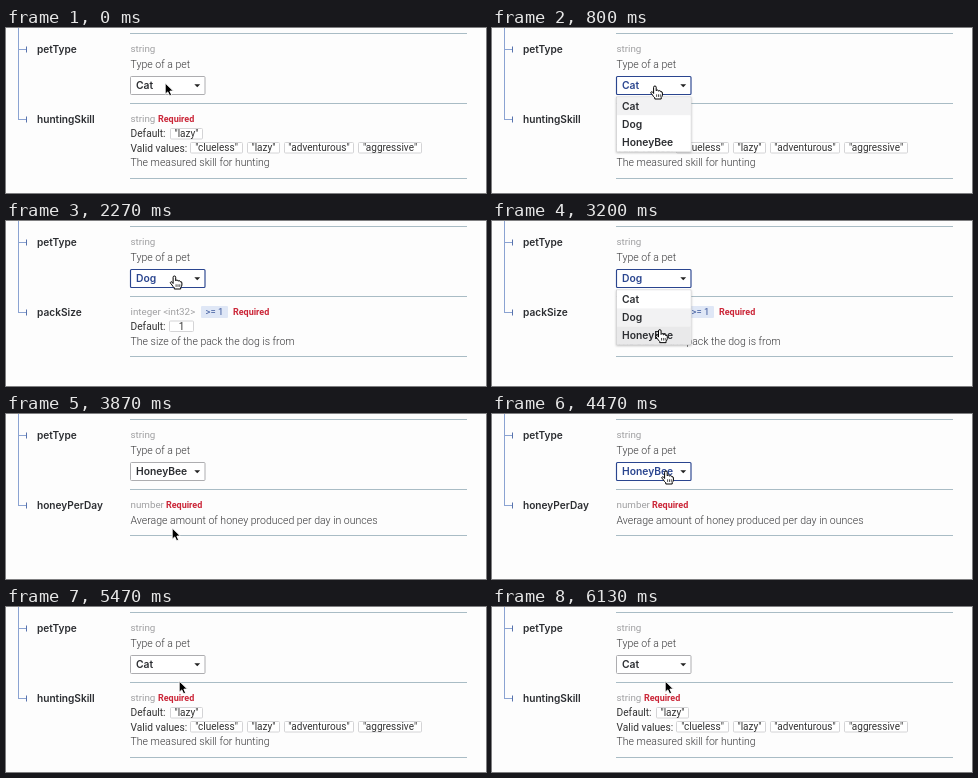
An HTML page for the animation above (6.19 s loop, 480x165 px).

```html
<!DOCTYPE html>
<html lang="en">
<head>
<meta charset="utf-8">
<title>Pet schema</title>
<style>
html, body { margin: 0; width: 100%; height: 100%; overflow: hidden; background: #fdfdfd; }
svg { display: block; width: 480px; height: 165px; }
text { font-family: Roboto, Arial, sans-serif; white-space: pre; }
.name, .pick { font: 600 10.15px Inter, Montserrat, sans-serif; fill: #2b2d31; }
.pick { font-size: 10.3px; }
.type { font-size: 9.8px; fill: #a0a0a2; }
.req { font-size: 9px; font-weight: 700; fill: #cb2638; }
.desc { font-size: 10.53px; font-weight: 300; fill: #38383a; }
.label { font-size: 10.2px; fill: #333; }
.chip { font-size: 10px; fill: #333; text-anchor: middle; }
.chipBox { fill: #fff; stroke: #d4d4d6; }
.range { font-size: 9.5px; fill: #37549a; text-anchor: middle; }
.rule { stroke: #a9bcc5; }
.tree { stroke: #8ba3d2; fill: none; }
.bullet { stroke: #5873ad; }
</style>
</head>
<body>
<svg viewBox="0 0 480 165">
  <defs>
    <filter id="shade" x="-10%" y="-10%" width="120%" height="125%">
      <feDropShadow dx="0" dy="1" stdDeviation="1.2" flood-opacity=".25"/>
    </filter>
  </defs>
  <rect width="480" height="165" fill="#fdfdfd"/>
  <path class="tree" d="M12.5 0V92M12 21.5H20M12 91.5H20"/>
  <path class="bullet" d="M20.5 18.5V24.5M20.5 88.5V94.5"/>
  <path class="rule" d="M124 5.5H461M124 75.5H461"/>
  <text class="name" x="31" y="25">petType</text>
  <text class="type" x="124.5" y="24">string</text>
  <text class="desc" x="124.5" y="40">Type of a pet</text>
  <g id="details"></g>
  <rect id="box" x="124.5" y="48.5" width="74.5" height="18" rx="1" fill="#fff"/>
  <text id="value" class="pick" x="130" y="61"></text>
  <path d="M188.3 56.2H194.2L191.25 59.3Z" fill="#222"/>
  <g id="list">
    <rect x="124.5" y="69" width="74.5" height="54.5" fill="#fff" stroke="#d0d0d2" stroke-width=".8" filter="url(#shade)"/>
    <g id="rows"></g>
  </g>
  <g id="cursor" stroke-linejoin="round">
    <path id="arrow" d="M-.8 0V11.2L1.8 8.9L3.6 12.8L5.6 11.9L3.9 8.1H7.4Z" fill="#000" stroke="#fff" stroke-width=".9"/>
    <g id="hand">
      <path d="M-1.4 7.5V1.3Q-1.4 0 -.1 0T1.2 1.3V4.8Q1.6 3.9 2.5 4T3.6 5.2Q4.2 4.3 5 4.7T5.8 5.8Q7.4 5.2 7.4 7V9Q7.2 10.6 6.2 11.6V13H-.2V11.8Q-1.6 10.6 -2.5 9L-4 7.2Q-4.5 6.2 -3.6 5.8T-2 6.7Z" fill="#fff" stroke="#000"/>
      <path d="M1.6 8.3V10.9M3.5 8.3V10.9M5.3 8.3V10.9" stroke="#000" stroke-width=".7"/>
    </g>
  </g>
</svg>
<script>
const LOOP = 6190;
const BLUE = '#2a458f';
const PETS = ['Cat', 'Dog', 'HoneyBee'];
const LIST_TOP = 69, ROW = 18;
const $ = id => document.getElementById(id);

const text = (cls, x, y, s) =>
  `<text class="${cls}" x="${x}" y="${y}">${s.replace(/</g, '&lt;')}</text>`;
const chip = (x, y, w, s) =>
  `<rect class="chipBox" x="${x + .5}" y="${y + .5}" width="${w}" height="10.5" rx="1"/>` +
  text('chip', x + .5 + w / 2, y + 9.3, s);
const rule = y => `<path class="rule" d="M124 ${y}.5H461"/>`;
const heading = (name, type, reqX) =>
  text('name', 31, 95, name) + text('type', 124.5, 94, type) + text('req', reqX, 94, 'Required');

const details = [
  heading('huntingSkill', 'string', 152) +
    text('label', 124.5, 109, 'Default:') + chip(164, 100, 32, '"lazy"') +
    text('label', 124.5, 123.5, 'Valid values:') +
    chip(184, 114, 52, '"clueless"') + chip(241, 114, 32, '"lazy"') +
    chip(278, 114, 69, '"adventurous"') + chip(352, 114, 63, '"aggressive"') +
    text('desc', 124.5, 138.3, 'The measured skill for hunting') + rule(150),
  heading('packSize', 'integer <int32>', 227) +
    '<rect x="195" y="85" width="27" height="12" rx="1" fill="#dfe7f6"/>' +
    text('range', 208.5, 94, '>= 1') +
    text('label', 124.5, 109, 'Default:') + chip(163, 99.5, 24, '1') +
    text('desc', 124.5, 124.3, 'The size of the pack the dog is from') + rule(135),
  heading('honeyPerDay', 'number', 160) +
    text('desc', 124.5, 109.5, 'Average amount of honey produced per day in ounces') + rule(121)
];

// Each visit to the list: opening time, choosing time, choice
const visits = [[800, 1530, 1], [2600, 3400, 2], [4500, 5400, 0]];

// Cursor stops: time, x, y
const path = [
  [0, 160, 55], [130, 160, 55], [600, 163, 58], [1070, 163, 58],
  [1400, 157, 95], [1530, 157, 95], [2130, 168.5, 55], [2700, 168.5, 55],
  [3150, 168, 108], [3400, 167, 114], [3930, 167, 114], [4300, 174, 57],
  [4850, 174, 57], [5000, 174, 67], [5150, 174, 74], [LOOP, 174, 74]
];

function cursorAt(t) {
  const i = path.findIndex(p => p[0] > t);
  const [t0, x0, y0] = path[i - 1], [t1, x1, y1] = path[i];
  const u = (t - t0) / (t1 - t0), k = u * u * (3 - 2 * u);
  return [x0 + (x1 - x0) * k, y0 + (y1 - y0) * k];
}

$('rows').innerHTML = PETS.map((pet, i) =>
  `<rect x="125" y="${LIST_TOP + .4 + i * ROW}" width="73.5" height="${ROW}"/>` +
  text('pick', 130, 82 + i * 17.8, pet)).join('');
const rowBoxes = $('rows').querySelectorAll('rect');
const show = (id, on) => $(id).setAttribute('visibility', on ? 'visible' : 'hidden');
let shown = -1;

function draw(t) {
  let pet = 0, open = false;
  for (const [from, to, choice] of visits) {
    if (t >= to) pet = choice;
    else if (t >= from) open = true;
  }
  const [x, y] = cursorAt(t);
  const onBox = t >= 130 && y >= 48 && y <= 66.5;
  const hovered = open && y >= LIST_TOP ? Math.floor((y - LIST_TOP) / ROW) : -1;
  const active = onBox || open;
  const hand = onBox || hovered >= 0;

  if (pet !== shown) {
    $('details').innerHTML = details[pet];
    $('value').textContent = PETS[pet];
    shown = pet;
  }
  $('box').setAttribute('stroke', active ? BLUE : '#adadb0');
  $('box').setAttribute('stroke-width', active ? 1.15 : 1);
  $('value').style.fill = active ? BLUE : '#2b2d31';
  rowBoxes.forEach((row, i) =>
    row.setAttribute('fill', i === hovered ? '#e9e9ea' : i === pet ? '#f2f2f3' : '#fff'));
  show('list', open);
  show('arrow', !hand);
  show('hand', hand);
  $('cursor').setAttribute('transform', `translate(${x.toFixed(2)} ${y.toFixed(2)})`);
}

const start = performance.now();
function tick() {
  draw((performance.now() - start) % LOOP);
  requestAnimationFrame(tick);
}
tick();
</script>
</body>
</html>
```
